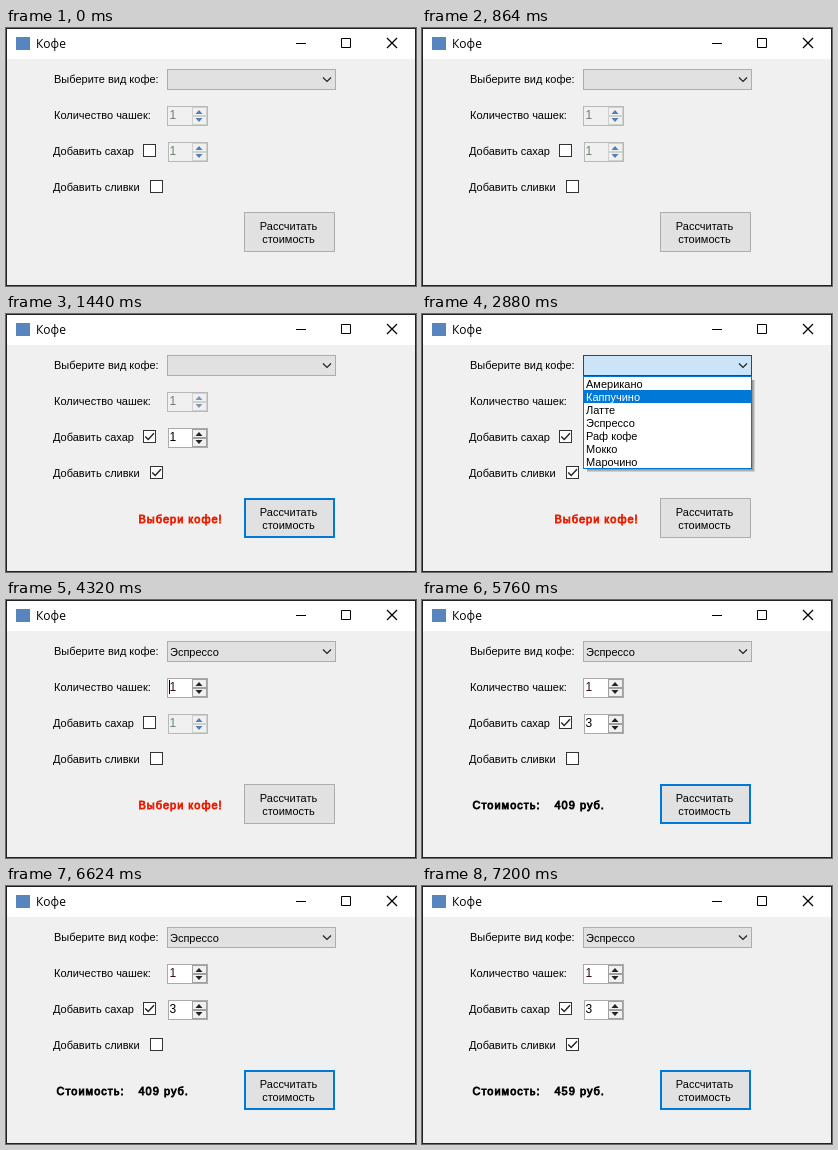
Write an HTML page that moves like this. It is 410 by 258 pixels and loops after 8 s.

```html
<!DOCTYPE html>
<html lang="ru">
<head>
<meta charset="utf-8">
<title>Кофе</title>
<style>
  html, body { margin: 0; width: 100%; height: 100%; overflow: hidden; }
  svg { display: block; width: 100%; height: 100%; }
  text { font: 11px "Liberation Sans", Arial, sans-serif; white-space: pre; }
  .title { font: 12px "Open Sans", sans-serif; }
  .digit { font-size: 12px; }
  /* Emboldened regular face: each glyph is one pixel wider. */
  .bold { stroke: currentColor; stroke-width: .8px; letter-spacing: 1px; }
</style>
</head>
<body>
<svg id="stage" viewBox="0 0 410 258"></svg>
<script>
const stage = document.getElementById("stage");
const BLUE = "#0078d7", GREY = "#adadad", INK = "#000";
const DRINKS = ["Американо", "Каппучино", "Латте", "Эспрессо", "Раф кофе", "Мокко", "Марочино"];

const STEPS = [
  { at: 0 },
  { at: 1440, sugar: 1, sugarOn: true, cream: true, warn: true, focus: true },
  { at: 2880, sugarOn: true, cream: true, warn: true, open: true },
  { at: 4320, drink: "Эспрессо", caret: true, warn: true },
  { at: 5760, drink: "Эспрессо", sugarOn: true, sugar: 3, price: 409, focus: true },
  { at: 7200, drink: "Эспрессо", sugarOn: true, sugar: 3, price: 459, cream: true, focus: true },
];
const LOOP = 8000;

const fill = (x, y, w, h, color, more = "") =>
  `<rect x="${x}" y="${y}" width="${w}" height="${h}" fill="${color}" ${more}/>`;
const box = (x, y, w, h, color, edge, line = 1) =>
  fill(x + line / 2, y + line / 2, w - line, h - line, color, `stroke="${edge}" stroke-width="${line}"`);
const label = (x, y, words, color = INK, more = "") =>
  `<text x="${x}" y="${y}" fill="${color}" ${more}>${words}</text>`;
const bold = (x, words, color = INK) =>
  label(x + .5, 209, words, color, `class="bold" color="${color}"`);
const stroke = (d, color = INK, width = 1) =>
  `<path d="${d}" fill="none" stroke="${color}" stroke-width="${width}"/>`;

function checkBox(x, y, on) {
  return box(x, y, 13, 13, "#fff", "#333") +
    (on ? stroke(`M${x + 2.2} ${y + 6.5}l3 3 5.8-6.2`, "#222", 1.4) : "");
}

function spinner(x, y, value, enabled, digitColor, arrowColor) {
  const edge = enabled ? "#a0a0a0" : "#d0d0d0";
  const arrow = (base, dir) =>
    `<path d="M189.5 ${base}h7l-3.5 ${4 * dir}z" fill="${arrowColor}"/>`;
  return box(x, y, 202 - x, 20, enabled ? "#fff" : "#f0f0f0", enabled ? "#aaa" : "#b8b8b8") +
    box(186, y + 1, 15, 9, "#f0f0f0", edge) +
    box(186, y + 10, 15, 9, "#f0f0f0", edge) +
    arrow(y + 8, -1) + arrow(y + 12, 1) +
    label(163.5, y + 13, value, digitColor, 'class="digit"');
}

function windowFrame() {
  return fill(0, 0, 410, 258, "#f0f0f0") + fill(0, 0, 410, 31, "#fff") +
    box(0, 0, 410, 258, "none", "#222") +
    fill(10, 9, 14, 13, "#5686bd") +
    label(30, 20, "Кофе", INK, 'class="title"') +
    stroke("M290 15.5h10M335.5 10.5h9v9h-9z") +
    stroke("M381 10l10 10m0-10l-10 10", INK, 1.3);
}

function comboBox({ open, drink = "" }) {
  return box(161, 41, 169, 21, open ? "#cce4f7" : "#e1e1e1", open ? "#005499" : GREY) +
    stroke("M317 49.5l4 4 4-4", "#222", 1.2) + label(164, 56, drink);
}

function dropDown() {
  const rows = DRINKS.map((name, i) => {
    const top = 63 + 13 * i, picked = i === 1;
    return (picked ? fill(162, top, 167, 13, BLUE) : "") +
      label(164, top + 11, name, picked ? "#fff" : INK);
  });
  const shadow = [3, 2, 1].map(d => fill(165, 66, 165 + d, 89 + d, "#000", 'opacity=".14"'));
  return shadow.join("") + box(161, 62, 169, 93, "#fff", BLUE) + rows.join("");
}

function draw(s) {
  const cupsOn = Boolean(s.drink);
  const parts = [
    windowFrame(),
    label(48, 55, "Выберите вид кофе:"),
    label(48, 91, "Количество чашек:"),
    label(47, 127, "Добавить сахар"),
    label(47, 163, "Добавить сливки"),
    comboBox(s),
    spinner(161, 78, 1, cupsOn, cupsOn ? "#301018" : "#777",
      cupsOn ? "#222" : s.sugarOn ? "#8097ad" : "#4f7fb5"),
    spinner(162, 114, s.sugar || 1, s.sugarOn, s.sugarOn ? INK : "#66886f", s.sugarOn ? "#222" : "#4f7fb5"),
    checkBox(137, 116, s.sugarOn),
    checkBox(144, 152, s.cream),
    box(238, 184, 91, 40, "#e1e1e1", s.focus ? BLUE : GREY, s.focus ? 2 : 1),
    label(282.5, 202, "Рассчитать", INK, 'text-anchor="middle"'),
    label(282.5, 215, "стоимость", INK, 'text-anchor="middle"'),
  ];
  if (s.caret) parts.push(fill(163, 80, 1, 14, INK));
  if (s.warn) parts.push(bold(132, "Выбери кофе!", "#e81c00"));
  if (s.price) parts.push(bold(50, "Стоимость:"), bold(132, `${s.price} руб.`));
  if (s.open) parts.push(dropDown());
  stage.innerHTML = parts.join("");
}

let shown;
function tick() {
  const time = performance.now() % LOOP;
  const step = STEPS.findLast(s => s.at <= time);
  if (step !== shown) draw(shown = step);
  requestAnimationFrame(tick);
}
tick();
</script>
</body>
</html>
```
